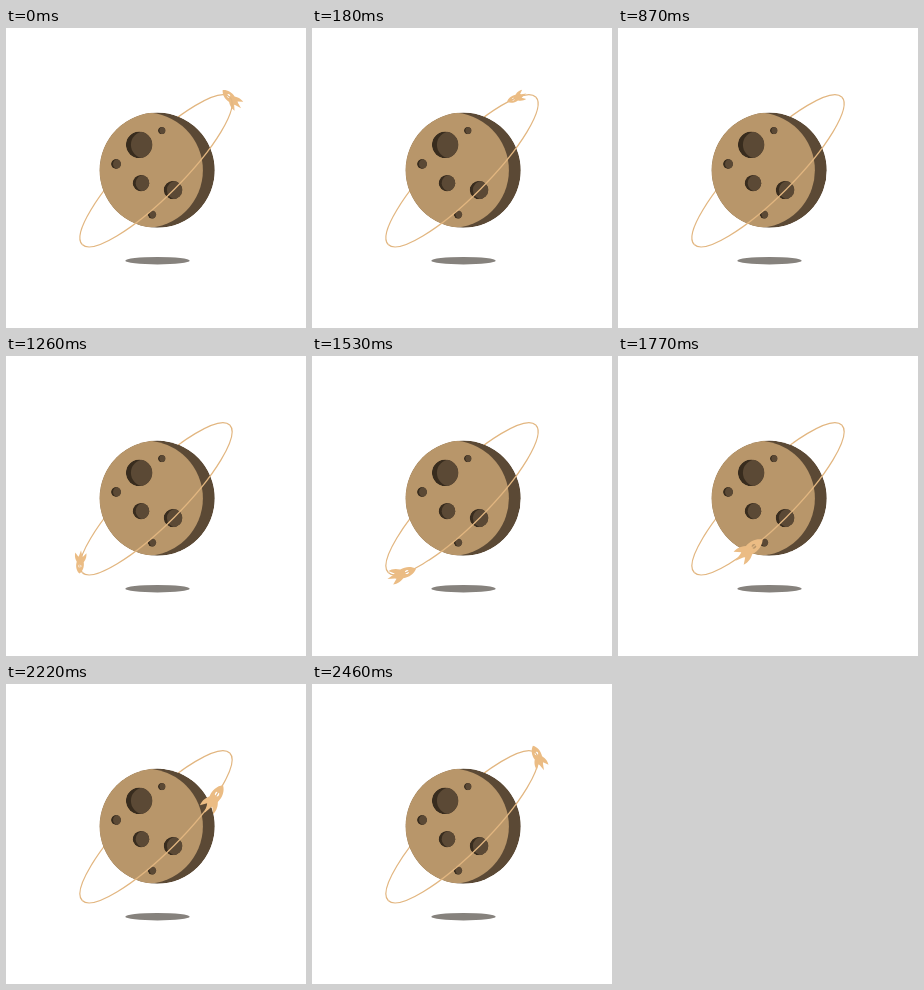
Animation of 300x300 px, one loop 2.49 s. Source, as an HTML page:

```html
<!DOCTYPE html>
<html lang="en">
<head>
<meta charset="utf-8">
<title>Rocket orbit</title>
<style>
  html, body { margin: 0; width: 100%; height: 100%; overflow: hidden; background: #fff; }
  svg { display: block; width: 100vw; height: 100vh; }
  .ring { fill: none; stroke: #e2b680; stroke-width: 1.25; }
</style>
</head>
<body>
<svg viewBox="0 0 300 300">
  <defs>
    <clipPath id="globe"><circle cx="151.2" cy="142.2" r="57.6"/></clipPath>
    <path id="rocket" fill-rule="evenodd" d="M13 0C10 -3.6 5 -5 0 -3.9C-4 -6.6 -7 -6.6 -10 -6.2L-5.6 -2.4L-7 -1.7L-13 0L-7 1.7L-5.6 2.4L-10 6.2C-7 6.6 -4 6.6 0 3.9C5 5 10 3.6 13 0ZM6.4 0A1.7 1.7 0 1 0 3 0A1.7 1.7 0 1 0 6.4 0Z"/>
  </defs>
  <ellipse cx="151.5" cy="232.7" rx="32.2" ry="3.7" fill="#86827d"/>
  <path class="ring" transform="translate(150 142.8) rotate(-45)" d="M-104.3 0A104.3 26 0 0 1 104.3 0"/>
  <use id="far" href="#rocket" fill="#ebbc84"/>
  <g clip-path="url(#globe)">
    <circle cx="151.2" cy="142.2" r="57.6" fill="#5b4935"/>
    <circle cx="139.3" cy="142.2" r="57.6" fill="#b8966a"/>
  </g>
  <g id="craters"></g>
  <path class="ring" transform="translate(150 142.8) rotate(-45)" d="M-104.3 0A104.3 26 0 0 0 104.3 0"/>
  <use id="near" href="#rocket" fill="#ebbc84"/>
</svg>
<script>
const LOOP = 2490, A = 104.3, B = 26, CX = 150, CY = 142.8;
const $ = id => document.getElementById(id);

// Craters: x, y, radius, width of the shaded left edge
const craters = [
  [133.1, 116.8, 13.2, 5], [155.7, 102.6, 3.7, 1.4], [110, 136, 5, 2],
  [135, 155.2, 8.3, 3], [167, 162, 9.3, 3.2], [146, 186.6, 4.2, 1.7]
];
$('craters').innerHTML = craters.map(([x, y, r, d], i) =>
  `<clipPath id="c${i}"><circle cx="${x}" cy="${y}" r="${r}"/></clipPath>
   <g clip-path="url(#c${i})"><circle cx="${x}" cy="${y}" r="${r}" fill="#382c1e"/>
   <circle cx="${x + d}" cy="${y}" r="${r}" fill="#5b4935"/></g>`).join('');

// Orbit angle travelled (degrees) at given times
const keys = [[0, 0], [390, 66], [870, 111], [1260, 164], [1770, 244], [2010, 272]];

function key(i) {
  const n = keys.length, turn = Math.floor(i / n), [t, a] = keys[i - turn * n];
  return [t + turn * LOOP, a + turn * 360];
}

function slope(i) {
  const [t0, a0] = key(i - 1), [t1, a1] = key(i), [t2, a2] = key(i + 1);
  const h0 = t1 - t0, h1 = t2 - t1;
  return ((a1 - a0) / h0 * h1 + (a2 - a1) / h1 * h0) / (h0 + h1);
}

function travelled(t) {
  let i = 0;
  while (key(i + 1)[0] <= t) i++;
  const [t0, a0] = key(i), [t1, a1] = key(i + 1);
  const h = t1 - t0, s = (t - t0) / h, r = 1 - s;
  return a0 * (1 + 2 * s) * r * r + a1 * (3 - 2 * s) * s * s
    + h * s * r * (slope(i) * r - slope(i + 1) * s);
}

function draw(now) {
  const t = Math.floor((now % LOOP) / 30) * 30;
  const angle = -travelled(t) * Math.PI / 180;
  const cos = Math.cos(angle), sin = Math.sin(angle);
  const heading = Math.atan2(-B * cos, A * sin) * 180 / Math.PI;
  const scale = 1 + 0.36 * sin;
  const pose = `translate(${CX} ${CY}) rotate(-45) translate(${A * cos} ${B * sin}) `
    + `rotate(${heading}) scale(${scale}) translate(-3 0)`;
  const front = sin > 0;
  for (const [id, shown] of [['near', front], ['far', !front]]) {
    $(id).setAttribute('transform', pose);
    $(id).setAttribute('visibility', shown ? 'visible' : 'hidden');
  }
}

const start = performance.now();
function tick() {
  draw(performance.now() - start);
  requestAnimationFrame(tick);
}
tick();
</script>
</body>
</html>
```
